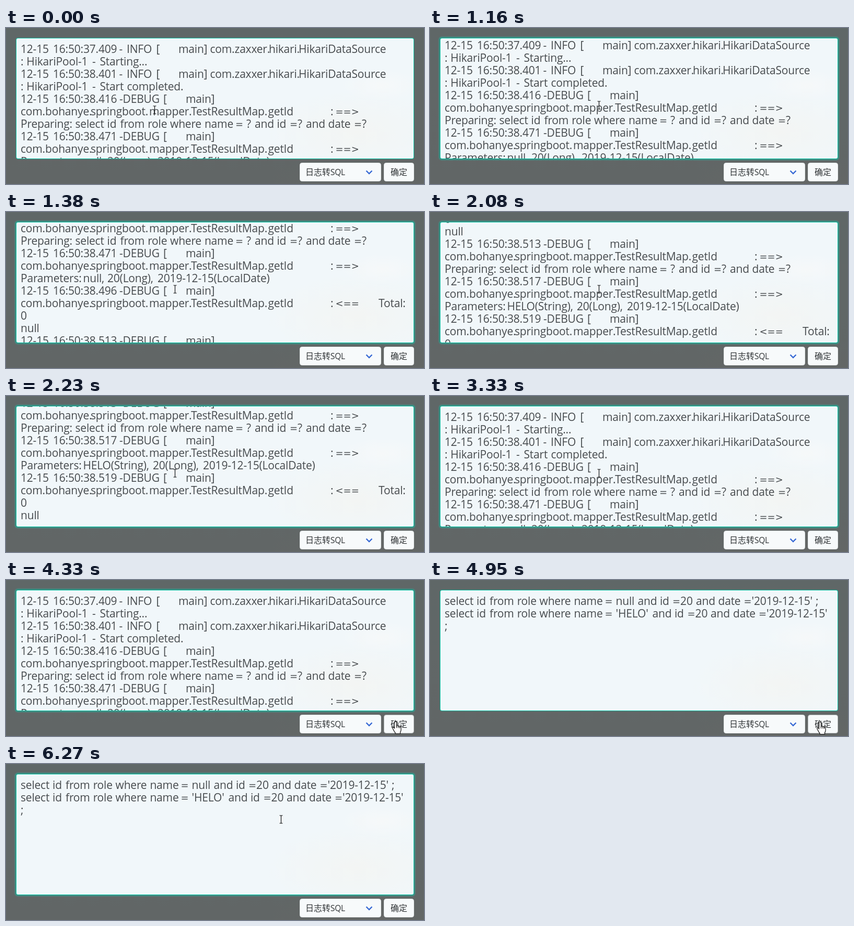
Recreate the animation shown at these times as an HTML page with a canvas. Size 800 by 300 pixels, loop 6.74 s.

```html
<!DOCTYPE html>
<html lang="zh">
<head>
<meta charset="utf-8">
<title>Log to SQL</title>
<style>
html, body { margin: 0; width: 100%; height: 100%; overflow: hidden; background: #606767; }
canvas { display: block; }
</style>
</head>
<body>
<canvas id="stage" width="800" height="300"></canvas>
<script>
const ctx = document.getElementById('stage').getContext('2d');
const LOOP = 6740, LINE = 24, LEFT = 28;
const TEXT_FONT = '21px "Open Sans", "Noto Sans", sans-serif';
const SIGN_FONT = '18px "DejaVu Sans", sans-serif';
const UI_FONT = '300 16px "Noto Sans CJK SC", "Noto Sans CJK", sans-serif';

// "|x text" starts a run at column x.
const stamp = time => `12-15|90 16:50:${time}`;
const info = time => `${stamp(time)}|216.5 -|231 INFO|287.5 [|330 main]|390.5 com.zaxxer.|503 hikari.|560 HikariDataSource`;
const debug = time => `${stamp(time)}|217 -DEBUG|301 [|344 main]`;
const pool = state => `: HikariPool-1|165 -|179.5 ${state}`;
const call = tail => `com.bohanye.|162 springboot.|274 mapper.|354 TestResultMap.|501.5 getId|621 :|630.5 ${tail}`;
const prepare = 'Preparing:|132.5 select id|218.5 from role|314 where name|439 =|460 ?|476 and|518.5 id|543 =?|574 and|616.5 date|666 =?';
const total = call('<==|713 Total:');

const log = [
  info('37.409'), pool('Starting...'),
  info('38.401'), pool('Start|231.5 completed.'),
  debug('38.416'), call('==>'), prepare,
  debug('38.471'), call('==>'), 'Parameters:|147.5 null,|194 20(Long),|290 2019-12-15(LocalDate)',
  debug('38.496'), total, '0', 'null',
  debug('38.513'), call('==>'), prepare,
  debug('38.517'), call('==>'), 'Parameters:|147.5 HELO(String),|281 20(Long),|377 2019-12-15(LocalDate)',
  debug('38.519'), total, '0', 'null'
];
const select = 'select id|114 from role|209.5 where name|334.5 =';
const sql = [
  select + "|355.5 null|397.5 and|440 id|464 =20|509 and|551.5 date|600.5 ='2019-12-15' ;",
  select + "|355.5 'HELO'|425.5 and|468 id|492.5 =20|537 and|580 date|629 ='2019-12-15'",
  ';'
];

// start, end, step count, first progress, from, to
const scrolls = [
  [1160, 1540, 6, .09, 0, 300],
  [2080, 2230, 3, .315, 300, 363],
  [3010, 3330, 5, .087, 363, 0]
];
const moves = [
  [70, 380, 5, .15, [284, 157], [323, 148]],
  [3710, 4330, 9, .1, [323, 148], [745, 272]],
  [4400, 4400, 1, 1, [745, 272], [746, 273]],
  [5260, 5640, 6, .13, [746, 273], [526, 106]]
];

const smooth = u => u * u * (3 - 2 * u);
const mix = (a, b, p) => Array.isArray(a) ? a.map((v, i) => mix(v, b[i], p)) : a + (b - a) * p;

function track(list, t) {
  let value = list[0][4];
  for (const [start, end, steps, first, from, to] of list) {
    if (t < start) break;
    if (t >= end) { value = to; continue; }
    const k = Math.floor((t - start) / (end - start) * (steps - 1) + 1e-6);
    value = mix(from, to, smooth(first + (1 - first) * k / (steps - 1)));
  }
  return value;
}

function box(x, y, w, h, r, fill, stroke) {
  ctx.beginPath();
  ctx.roundRect(x, y, w, h, r);
  if (fill) { ctx.fillStyle = fill; ctx.fill(); }
  if (stroke) { ctx.strokeStyle = stroke; ctx.lineWidth = 1; ctx.stroke(); }
}

function blob(x, y, rx, ry, color) {
  ctx.save();
  ctx.translate(x, y);
  ctx.scale(rx, ry);
  const g = ctx.createRadialGradient(0, 0, 0, 0, 0, 1);
  g.addColorStop(0, `rgba(${color})`);
  g.addColorStop(1, `rgba(${color.replace(/[^,]+$/, '0')})`);
  ctx.fillStyle = g;
  ctx.fillRect(-1, -1, 2, 2);
  ctx.restore();
}

function backdrop() {
  const g = ctx.createLinearGradient(0, 0, 0, 300);
  g.addColorStop(0, '#5f6767');
  g.addColorStop(.5, '#616767');
  g.addColorStop(1, '#616666');
  ctx.fillStyle = g;
  ctx.fillRect(0, 0, 800, 300);
  blob(690, 300, 200, 60, '112,108,102,.25');
}

function panel(focused) {
  if (focused) box(16.25, 16.25, 767.5, 238.5, 6, 'rgba(0,209,178,.28)');
  box(19, 19, 762, 233, 4, '#08c5a6');
  box(20, 20, 760, 231, 3, '#f1f7fa');
  ctx.save();
  ctx.clip();
  blob(670, 200, 170, 80, '244,244,240,.65');
  blob(720, 110, 80, 30, '248,249,249,.7');
  ctx.restore();
}

function textLine(line, y) {
  line.split('|').forEach((run, i) => {
    const [, col, words] = i ? run.match(/^([\d.]+) (.*)$/) : [0, LEFT, run];
    let x = +col;
    for (const part of words.split(/([=<>]+)/)) {
      const sign = /^[=<>]/.test(part);
      ctx.font = sign ? SIGN_FONT : TEXT_FONT;
      ctx.letterSpacing = sign ? '0px' : '-0.2px';
      ctx.wordSpacing = sign ? '0px' : '0.7px';
      ctx.fillText(part, x, y - (sign ? 1 : 0));
      x += ctx.measureText(part).width;
    }
  });
}

function content(lines, scroll) {
  ctx.save();
  ctx.beginPath();
  ctx.rect(20, 20, 760, 231);
  ctx.clip();
  ctx.fillStyle = '#474b4e';
  lines.forEach((line, i) => {
    const y = 48 + i * LINE - Math.round(scroll);
    if (y > 0 && y < 280) textLine(line, y);
  });
  ctx.restore();
}

function controls(hover) {
  box(562.5, 259.5, 155, 35, 4, '#f7fafb', '#e0e5e6');
  box(723.5, 259.5, 57, 35, 4, '#f7fafb', hover ? '#b5b9ba' : '#e0e5e6');
  ctx.font = UI_FONT;
  ctx.letterSpacing = ctx.wordSpacing = '0px';
  ctx.fillStyle = '#303436';
  ctx.fillText('日志转', 573, 283);
  ctx.fillText('确定', 736, 283);
  ctx.font = '15.5px "Open Sans", sans-serif';
  ctx.letterSpacing = '-0.3px';
  ctx.fillText('SQL', 621, 283);
  ctx.strokeStyle = '#3568d4';
  ctx.lineWidth = 2.4;
  ctx.stroke(new Path2D('M689.5 274.5l5.5 5.5l5.5 -5.5'));
}

const beam = new Path2D('M-3 -7.5H-1Q0 -7.5 0 -6.5Q0 -7.5 1 -7.5H3M0 -6.5V6.5M-3 7.5H-1Q0 7.5 0 6.5Q0 7.5 1 7.5H3');
const arrow = new Path2D('M0 0V16L3.7 12.5L6.2 18.3L8.8 17.2L6.3 11.6H11.4Z');
const hand = new Path2D('M-2 1.5Q-2 0 0 0Q2 0 2 1.5V8Q4 6.5 5.2 8.5Q7 7.5 8 9.5Q10.5 9 10.5 11.5V16Q10.5 18 9 20V23H-.5V21Q-3 18.5-4 15.5L-5.5 13Q-6 10.5-4 10.5L-2 12.5Z');
const fingers = new Path2D('M2 8V12M5.2 8.5V12M8 9.5V12.5');

const inside = (x, y, l, t, r, b) => x >= l && x <= r && y >= t && y <= b;

function cursor(x, y, onControl) {
  const overText = inside(x, y, 20, 20, 780, 251);
  ctx.save();
  ctx.translate(Math.round(x) + .5, Math.round(y) + .5);
  ctx.lineWidth = 1;
  ctx.strokeStyle = '#111';
  ctx.fillStyle = '#fff';
  if (overText) {
    ctx.lineWidth = 1.2;
    ctx.stroke(beam);
  } else if (onControl) {
    ctx.fill(hand);
    ctx.lineWidth = 1.2;
    ctx.stroke(hand);
    ctx.stroke(fingers);
  } else {
    ctx.fill(arrow);
    ctx.stroke(arrow);
  }
  ctx.restore();
}

function draw(t) {
  const [x, y] = track(moves, t);
  const onButton = inside(x, y, 723, 259, 781, 295);
  const onSelect = inside(x, y, 562, 259, 718, 295);
  const focused = (t >= 530 && t < 4800) || t >= 6120;
  backdrop();
  panel(focused);
  if (t < 4950) content(log, track(scrolls, t));
  else content(sql, 0);
  controls(onButton);
  cursor(x, y, onButton || onSelect);
}

const begin = performance.now();
function tick() {
  draw((performance.now() - begin) % LOOP);
  requestAnimationFrame(tick);
}
tick();
</script>
</body>
</html>
```
